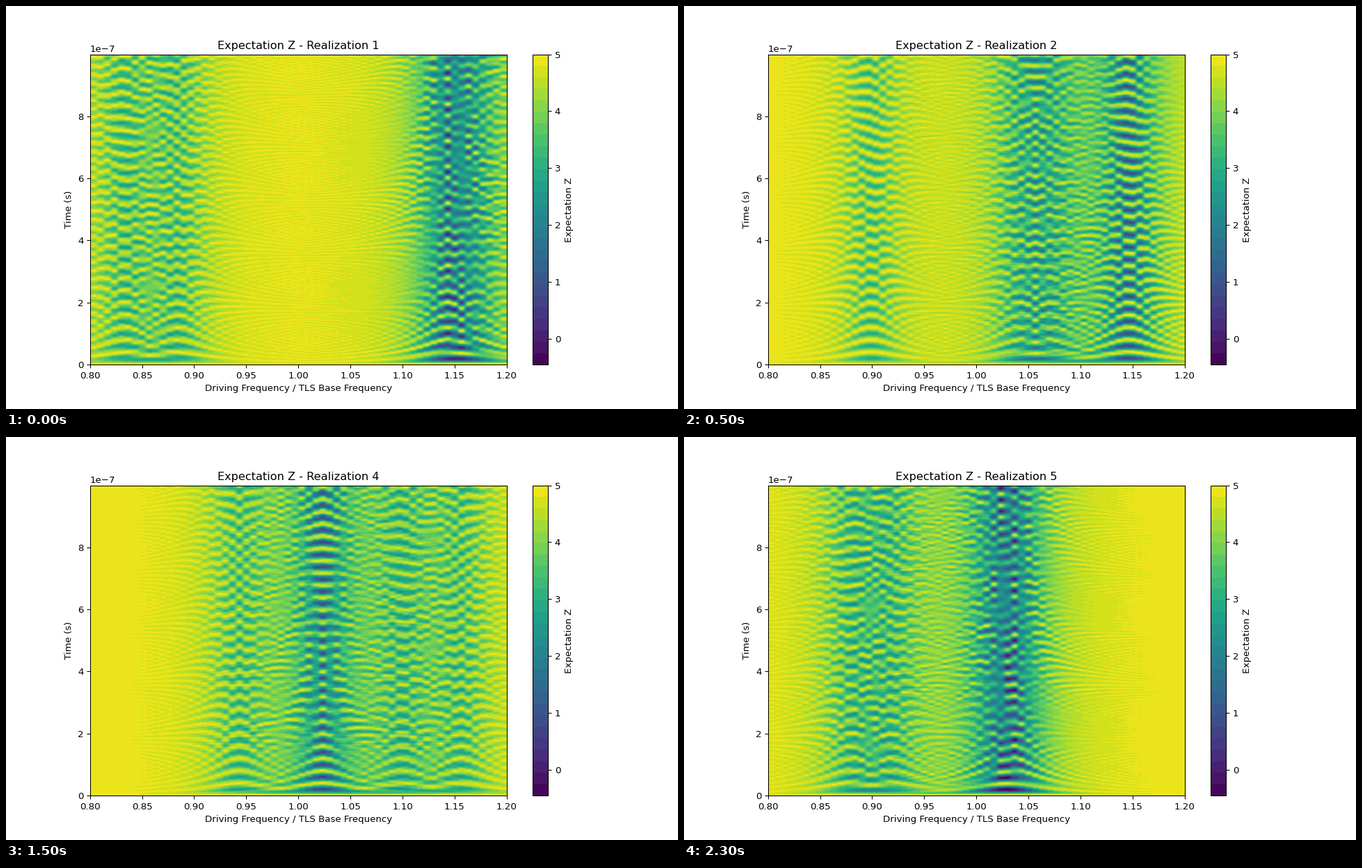
Animation, 966 px wide and 580 px high, one loop 2500 ms. Source, as a matplotlib script:

```python
import matplotlib.pyplot as plt
import numpy as np
from matplotlib.animation import FuncAnimation
from matplotlib.colors import ListedColormap

WIDTH, HEIGHT, DPI = 966, 580, 96.6
RABI_HZ = 25e6
RABI = 0.0283       # Rabi rate in units of the base frequency
LEVELS = 27

# Each realization: two mirrored pairs (centre, half gap) and a lone resonance
REALIZATIONS = [
    ((0.856, 0.026), (1.146, 0.0013), 1.173),
    ((1.0575, 0.0145), (1.1485, 0.0003), 0.897),
    ((0.9945, 0.0985), (1.016, 0.0035), 0.9905),
    ((1.0505, 0.108), (1.0237, 0.003), 1.101),
    ((0.8975, 0.019), (1.036, 0.0015), 1.0165),
]

drive = np.linspace(0.8, 1.2, 60)
times = np.arange(1000) * 1e-9


def resonances(*pairs_and_lone):
    *pairs, lone = pairs_and_lone
    mirrored = [mid + side * gap for mid, gap in pairs for side in (-1, 1)]
    return mirrored + [lone]


def oscillation(res):
    """Z of one driven two-level system over time and drive frequency."""
    rate = np.hypot(1, (drive - res) / RABI)
    return 1 - 2 * (np.sin(np.pi * RABI_HZ * np.outer(times, rate)) / rate) ** 2


maps = [sum(map(oscillation, resonances(*row))) for row in REALIZATIONS]

plt.rcParams["font.family"] = "DejaVu Sans"
# The small margin keeps the pixel size from rounding down
fig, ax = plt.subplots(figsize=((WIDTH + 0.01) / DPI, (HEIGHT + 0.01) / DPI), dpi=DPI)

cmap = ListedColormap(plt.get_cmap("viridis")(np.linspace(0.015, 0.97, LEVELS)))
image = ax.imshow(maps[0], aspect="auto", origin="lower", cmap=cmap,
                  vmin=-0.455, vmax=5, extent=[0.8, 1.2, 0, times[-1]])
fig.colorbar(image, ax=ax, label="Expectation Z")
ax.set_xlabel("Driving Frequency / TLS Base Frequency")
ax.set_ylabel("Time (s)")
title = ax.set_title("Expectation Z - Realization 1")


def update(i):
    image.set_data(maps[i])
    title.set_text(f"Expectation Z - Realization {i + 1}")
    return image, title


anim = FuncAnimation(fig, update, frames=len(maps), interval=500,
                     repeat=True, repeat_delay=0)
plt.show()
```
